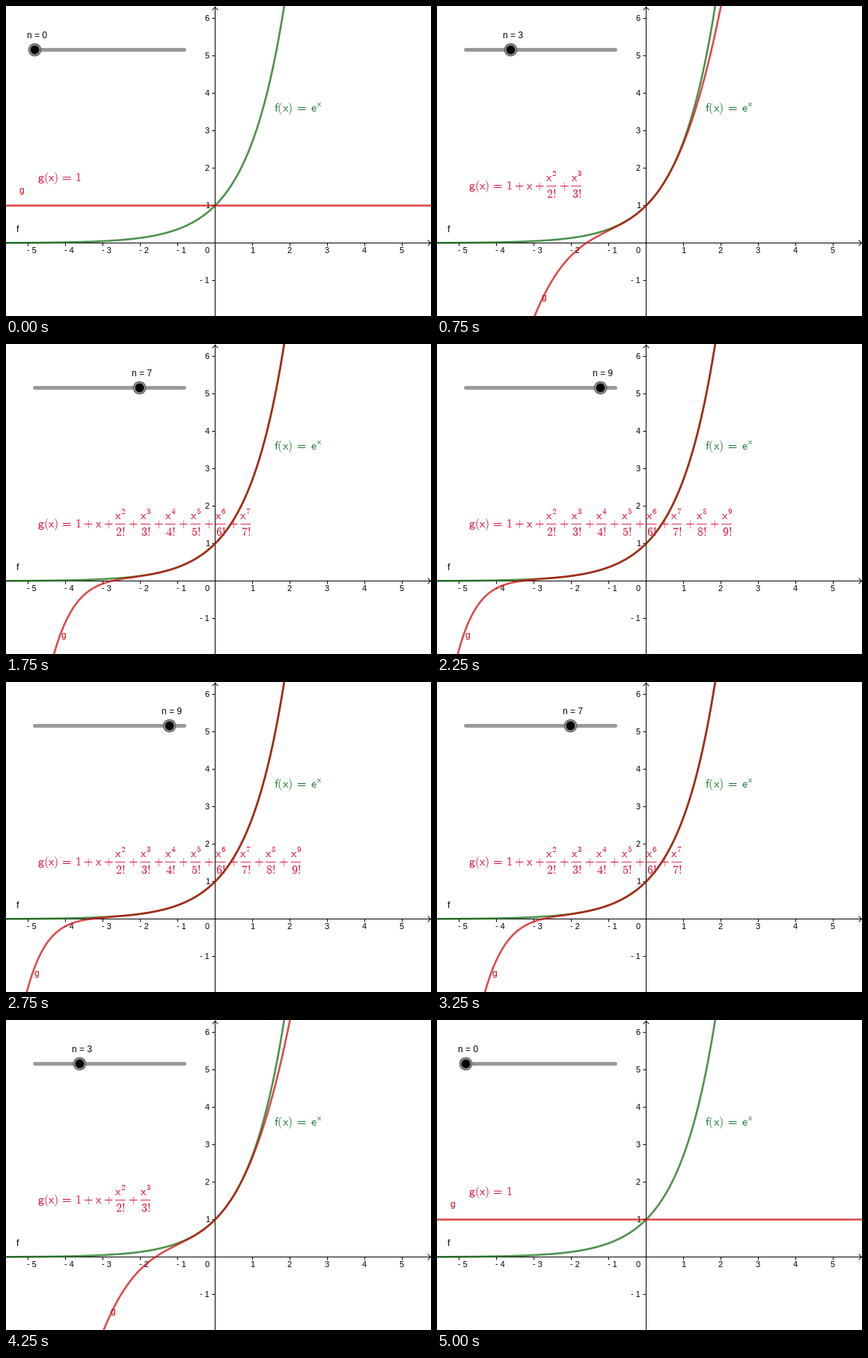
Recreate the animation shown at these times as a matplotlib script. Size 568 by 414 pixels, loop 5250 ms.

```python
"""Taylor polynomials of e^x, with the degree driven by a slider."""
from math import factorial

import numpy as np
import matplotlib.pyplot as plt
from matplotlib.animation import FuncAnimation
from matplotlib.patches import Circle

W, H, DPI = 568, 414, 72          # at 72 dpi a point is a pixel
OX, OY, UNIT = 279.5, 316.5, 50   # origin and scale in pixels
N_MAX = 10
GREEN, RED = "#006400", "#cc0000"
GREEN_TEXT, RED_TEXT = "#1f7a34", "#dc143c"
PLUS = r"\hspace{0.03}+\hspace{0.03}"

plt.rcParams.update({
    "font.family": "Liberation Sans",
    "mathtext.fontset": "cm",
    "text.hinting": "native",
    "path.snap": False,
})

fig = plt.figure(figsize=(W / DPI, H / DPI), dpi=DPI, facecolor="white")
ax = fig.add_axes([0, 0, 1, 1])
ax.set(xlim=(0, W), ylim=(H, 0))
ax.axis("off")

px = np.linspace(0, W, 2 * W + 1)
xs = (px - OX) / UNIT


def text(x, y, s, color="black", size=12, ha="left", z=6):
    return ax.text(x, y, s, color=color, size=size, ha=ha, va="baseline", zorder=z)


def sans(x, y, s, color, ha="center"):
    return text(x, y, rf"$\mathsf{{{s}}}$", color, 16, ha)


def equals(gap):
    return rf"\hspace{{{gap}}}=\hspace{{{gap}}}"


def stroke(x, y, color="black", lw=1.0, z=1, **kw):
    return ax.plot(x, y, color=color, lw=lw, zorder=z, **kw)[0]


def curve(y, color, z):
    return stroke(px, y, color, 2.6, z, alpha=0.7)


def draw_axes():
    stroke([0, W], [OY, OY])
    stroke([OX, OX], [1, H])
    stroke([W - 4, W - 0.5, W - 4], [OY - 3.5, OY, OY + 3.5])
    stroke([OX - 3.5, OX, OX + 3.5], [5, 1.5, 5])
    text(272, 330, "0", size=11, ha="right", z=2)
    for k in range(-5, 7):
        if k == 0:
            continue
        label = str(k) if k > 0 else f"- {-k}"
        x, y = OX + UNIT * k, OY - UNIT * k
        if k < 6:
            stroke([x, x], [OY, OY + 3.5])
            text(x - (0.5 if k > 0 else -4.5), 330, label, size=11, ha="center", z=2)
        if k > -2:
            stroke([OX - 3.5, OX], [y, y])
            text(272, y + 4, label, size=11, ha="right", z=2)


def draw_exp():
    curve(OY - UNIT * np.exp(xs), GREEN, 3)
    text(14, 302, "f")
    sans(358, 141, "f(x)" + equals(0.23) + "e^{x}", GREEN_TEXT, "left")


def formula(n):
    """One line of text with gaps, and the fractions set into the gaps."""
    base = 245 if n > 1 else 234
    line = "g(x)" + equals(0.17) + "1" + (PLUS + "x" if n else "")
    parts = []
    left = 146
    for k in range(2, n + 1):
        width = 13.5 if k < 10 else 21.5
        mid = left + width / 2
        line += PLUS + rf"\hspace{{{(width + 1) / 14:.2f}}}"
        parts += [sans(mid, base - 10, f"x^{{{k}}}", RED_TEXT),
                  sans(mid, base + 10.5, f"{k}!", RED_TEXT),
                  stroke([left, left + width], [240.5, 240.5], RED_TEXT, 0.9, 6,
                         solid_capstyle="butt")]
        left += width + 20
    return [sans(42.5, base, line, RED_TEXT, "left"), *parts]


def curve_label(y):
    """Put the name beside the point where the curve enters the view."""
    i = np.argmax((y > 0) & (y < H))
    if i == 0:
        return text(17, y[0] - 17, "g", RED)
    return text(px[i] + 9, max(y[i] - 20, 13), "g", RED)


def slider(n):
    x, y = 38.5 + 20 * n, 58.5
    ring = Circle((x, y), 8.3, fc="#8a8d8a", ec="#555855", lw=1, zorder=5)
    knob = Circle((x, y), 5.8, fc="black", ec="none", zorder=5.1)
    ax.add_patch(ring)
    ax.add_patch(knob)
    return [ring, knob, text(x - 11, 43, f"n = {n}")]


def scene(n):
    y = OY - UNIT * sum(xs**k / factorial(k) for k in range(n + 1))
    return [curve(y, RED, 4), curve_label(y), *formula(n), *slider(n)]


draw_axes()
draw_exp()
stroke([38.5, 238.5], [58.5, 58.5], "#999999", 5, 2, solid_capstyle="round")
scenes = [scene(n) for n in range(N_MAX + 1)]


def update(frame):
    n = N_MAX - abs(N_MAX - frame)
    for k, artists in enumerate(scenes):
        for artist in artists:
            artist.set_visible(k == n)


anim = FuncAnimation(fig, update, frames=2 * N_MAX + 1, interval=250,
                     init_func=lambda: update(0), repeat=True, repeat_delay=0)
plt.show()
```
